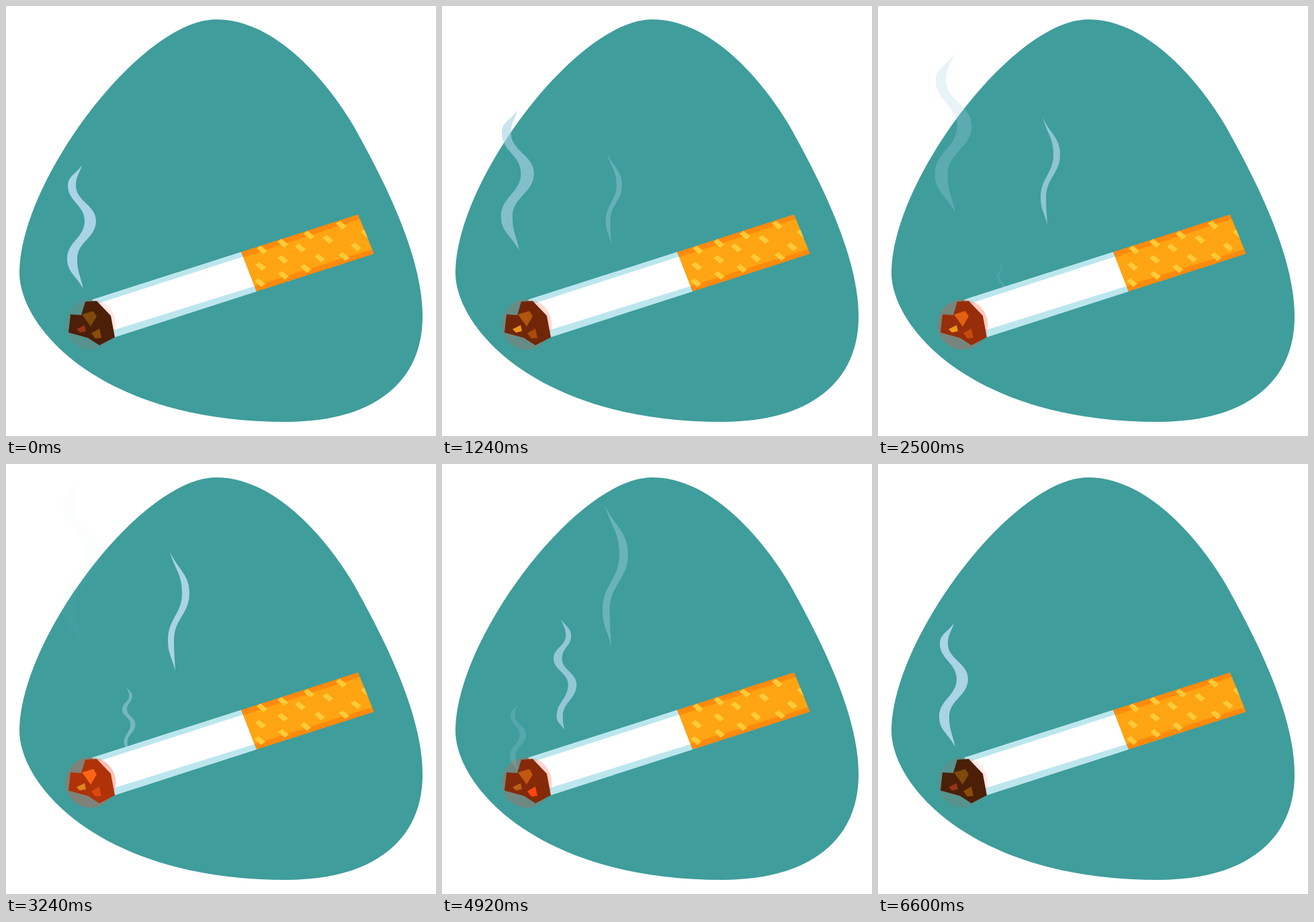
An HTML page that plays this animation: 640 by 640 pixels, repeating every 6.8 s.

```html
<!DOCTYPE html>
<html lang="en">
<head>
<meta charset="utf-8">
<title>Smouldering cigarette</title>
<style>
  html, body { margin: 0; width: 100%; height: 100%; overflow: hidden; background: #fff; }
  svg { display: block; width: 100%; height: 100%; }
</style>
</head>
<body>
<svg viewBox="0 0 640 640">
  <path fill="#3f9d9c" d="M313 20C395 20 470 100 517 178C560 255 620 370 620 462C620 565 540 619 418 619C140 619 20 478 20 397C20 262 200 20 313 20Z"/>
  <g id="smoke" fill="#aad3e6"></g>

  <path fill="#bce6ee" d="M128 437L350 366L373 425L162 493Z"/>
  <path fill="#fff" d="M136 443L353 373L370 417L158 483Z"/>
  <clipPath id="filter"><path d="M350 366L524 310L548 369L373 425Z"/></clipPath>
  <g clip-path="url(#filter)">
    <path fill="#ff8a0d" d="M350 366L524 310L548 369L373 425Z"/>
    <path fill="#ffa412" d="M353 374L527 317L545 362L369 417Z"/>
    <path id="spots" fill="#ffca38"/>
  </g>

  <circle id="glow" cx="126" cy="474" r="37.5" fill="#fa4e32"/>
  <g id="coal">
    <path d="M118 440L135 439L156 461L162 493L139 505L122 494L93 486L96 459L112 460Z"/>
    <path d="M113 459L130 454L135 462L126 477Z"/>
    <path d="M105 481L117 475L119 484L110 486Z"/>
    <path d="M127 487L139 480L142 494L133 495Z"/>
  </g>
</svg>
<script>
const LOOP = 6800, STEPS = 59;
const $ = selector => document.querySelector(selector);

// Spots lie in rows parallel to the filter: distance below the top row, then x positions.
const spotRows = [[0, 381, 412, 451, 499], [15, 438, 479], [24, 379, 412, 536], [39, 467, 521], [48, 378, 413, 446, 503]];
$('#spots').setAttribute('d', spotRows.flatMap(([drop, ...xs]) =>
  xs.map(x => `M${x - 8} ${361 + drop - .31 * (x - 379)}l6 -4l10 8l-6 5Z`)).join(''));

// Knots are y, left x, right x at full opacity; growth is per step before and after that moment.
const plumes = [
  { x: 114, peak: 59, fade: [20, 30], rise: 7.5, growth: [.0277, .0128],
    knots: [[237, 113, 113], [267, 92, 104], [320, 117, 134], [376, 91, 106], [421, 115, 115]] },
  { x: 252, peak: 29, fade: [28, 23], rise: 4.95, growth: [.0134, .0134],
    knots: [[131, 244, 244], [192, 262, 273], [262, 241, 250], [308, 252, 252]] },
  { x: 182, peak: 39, fade: [20, 19], rise: 7.18, growth: [.0348, .0348],
    knots: [[260, 178, 178], [281, 184, 191], [311, 168, 179], [345, 187, 198], [387, 172, 180], [404, 182, 182]] }
];

// One edge of a ribbon: upright at the bulges, slanted at the two tips.
function edge(points) {
  const last = points.length - 1;
  const handle = (i, j) => {
    const [x, y] = points[i], [nx, ny] = points[j];
    const slant = i === 0 || i === last ? .45 : 0;
    return `${x + (nx - x) * slant} ${y + (ny - y) * .45}`;
  };
  return points.slice(1).map((p, i) => `C${handle(i, i + 1)} ${handle(i + 1, i)} ${p.join(' ')}`).join('');
}

function ribbon(knots) {
  const left = knots.map(([y, l]) => [l, y]);
  const right = knots.map(([y, , r]) => [r, y]).reverse();
  return `M${left[0].join(' ')}${edge(left)}${edge(right)}Z`;
}

$('#smoke').innerHTML = plumes.map(p => `<path d="${ribbon(p.knots)}"/>`).join('');

const embers = [
  { cold: '#4b1f08', hot: '#b23309', peak: 30 },
  { cold: '#7f4a0c', hot: '#ff6613', peak: 28 },
  { cold: '#963418', hot: '#ffb01c', peak: 14 },
  { cold: '#8a4c0a', hot: '#ff4713', peak: 43 }
];

// Rises evenly from 0 to 1 at the peak, then falls back by the end of the loop.
const heat = (step, peak) => step < peak ? step / peak : (STEPS - step) / (STEPS - peak);

// The motion advances in groups of ten steps, 1120 ms per group.
function stepAt(ms) {
  if (ms < 120) return 0;
  const t = ms - 120;
  return Math.min(STEPS, 1 + 10 * Math.floor(t / 1120) + Math.min(9, Math.floor(t % 1120 / 110)));
}

function drawPlume({ x, peak, fade, rise, growth, knots }, el, step) {
  let age = step - peak;
  if (age < -fade[0]) age += STEPS;
  const phase = age < 0 ? 0 : 1;
  const opacity = Math.max(0, 1 - Math.abs(age) / fade[phase]);
  const top = knots[0][0];
  el.setAttribute('opacity', opacity);
  el.setAttribute('transform',
    `translate(${x} ${top - rise * age}) scale(${1 + growth[phase] * age}) translate(${-x} ${-top})`);
}

function draw() {
  const step = stepAt(performance.now() % LOOP);
  plumes.forEach((plume, i) => drawPlume(plume, $('#smoke').children[i], step));
  embers.forEach(({ cold, hot, peak }, i) => {
    $('#coal').children[i].style.fill = `color-mix(in srgb, ${hot} ${100 * heat(step, peak)}%, ${cold})`;
  });
  $('#glow').setAttribute('opacity', .12 + .23 * heat(step, 30));
  requestAnimationFrame(draw);
}
draw();
</script>
</body>
</html>
```
